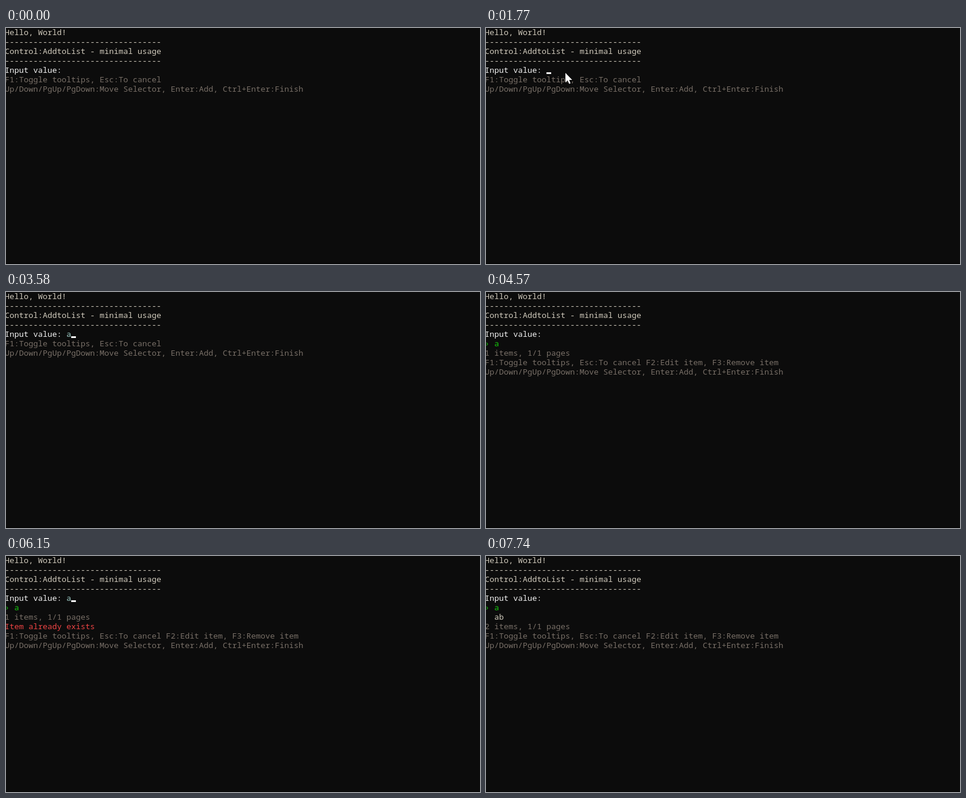
Write an HTML page with a canvas that moves like this. It is 800x400 px and loops after 8000 ms.

```html
<!DOCTYPE html>
<html lang="en">
<head>
<meta charset="utf-8">
<title>Add to list console</title>
<style>
  html, body { margin: 0; width: 100%; height: 100%; overflow: hidden; background: #0c0c0c; }
  canvas { display: block; }
</style>
</head>
<body>
<canvas id="stage" width="800" height="400"></canvas>
<script>
const ctx = document.getElementById('stage').getContext('2d');
const LOOP = 8000, CELL = 8, ROW = 16, LEFT = -2, BASELINE = 12;
const color = {
  back: '#0c0c0c', text: '#d0cabc', bright: '#f2f2f2', dim: '#786f67',
  input: '#9ccac4', green: '#16c60c', red: '#ee4444'
};
const arrow = new Path2D('M0 0V16.5L3.8 13 6.3 18.8 8.8 17.7 6.4 12H11.5Z');

// Each entry holds from its time until the next one.
const inputs = [[0, ''], [3580, 'a'], [3970, ''], [4760, 'a'], [6750, 'ab'], [7150, '']];
const lists = [[0, []], [3970, ['a']], [7150, ['a', 'ab']]];
const errors = [[0, ''], [5160, 'Item already exists'], [6750, '']];
const carets = [[0, false], [380, true], [780, false], [1380, true], [1970, false],
  [2570, true], [2970, false], [3360, true], [4570, false], [4760, true],
  [5560, false], [6150, true], [6550, false], [6750, true], [7740, false]];
const pointers = [[0, null], [190, [319, 138]], [380, [280, 132]], [580, [230, 95]],
  [780, [148, 61]], [1180, [141, 69]], [1380, [134, 76]], [1970, [462, 118]], [2570, null]];

const at = (track, time) => track.findLast(([start]) => start <= time)[1];

function write(text, row, fill, column = 0) {
  ctx.fillStyle = fill;
  ctx.fillText(text, LEFT + column * CELL, BASELINE + row * ROW);
}

function drawPointer([x, y]) {
  ctx.save();
  ctx.translate(x, y);
  ctx.strokeStyle = '#000';
  ctx.lineWidth = 1.5;
  ctx.stroke(arrow);
  ctx.fillStyle = '#fff';
  ctx.fill(arrow);
  ctx.restore();
}

function draw(time) {
  const input = at(inputs, time), items = at(lists, time), error = at(errors, time);
  const pointer = at(pointers, time);
  const prompt = 'Input value: ', rule = '-'.repeat(33);

  ctx.fillStyle = color.back;
  ctx.fillRect(0, 0, 800, 400);
  ctx.fillStyle = '#060606';
  ctx.fillRect(0, 398, 800, 2);
  ctx.font = '13.3333px "Noto Sans Mono", monospace';

  ['Hello, World!', rule, 'Control:AddtoList - minimal usage', rule]
    .forEach((line, row) => write(line, row, color.text));
  write(prompt, 4, color.bright);
  write(input, 4, color.input, prompt.length);

  let row = 5;
  items.forEach((item, i) =>
    write((i ? '  ' : '› ') + item, row++, i ? color.text : color.green));
  if (items.length) write(`${items.length} items, 1/1 pages`, row++, color.dim);
  if (error) write(error, row++, color.red);
  const editHelp = items.length ? ' F2:Edit item, F3:Remove item' : '';
  write('F1:Toggle tooltips, Esc:To cancel' + editHelp, row++, color.dim);
  write('Up/Down/PgUp/PgDown:Move Selector, Enter:Add, Ctrl+Enter:Finish', row, color.dim);

  if (at(carets, time)) {
    ctx.fillStyle = color.bright;
    ctx.fillRect(LEFT + (prompt.length + input.length) * CELL, 75, CELL, 3);
  }
  if (pointer) drawPointer(pointer);
}

const start = performance.now();
function frame() {
  draw((performance.now() - start) % LOOP);
  requestAnimationFrame(frame);
}
frame();
</script>
</body>
</html>
```
